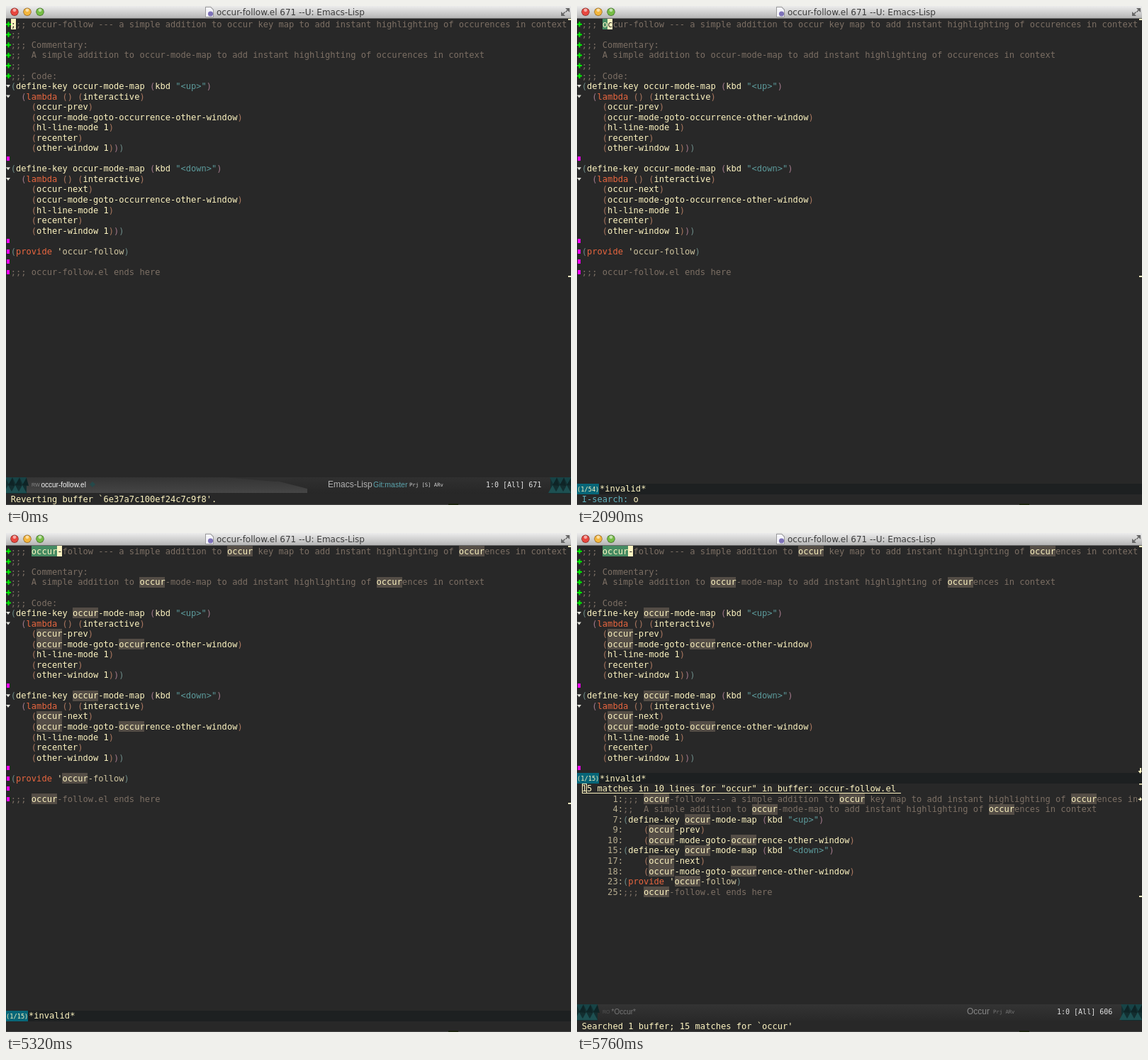
Animation, 797 px wide and 703 px high, one loop 8 s. Source, as an HTML page with a canvas:

```html
<!DOCTYPE html>
<html lang="en">
<head>
<meta charset="utf-8">
<title>occur-follow.el</title>
<style>
html, body { margin: 0; width: 100%; height: 100%; overflow: hidden; background: #282828; }
canvas { display: block; }
</style>
</head>
<body>
<canvas id="stage" width="797" height="703"></canvas>
<script>
const ctx = document.getElementById('stage').getContext('2d');
const LOOP = 8000, CHAR = 7.264, ROW = 14.54, LEFT = 6.8, TOP = 18.2, COLS = 108;
const MONO = '"DejaVu Sans Mono", monospace', SANS = '"Liberation Sans", Arial, sans-serif';
const BG = '#282828', FG = '#fdf4c1', COMMENT = '#7c6f64', KEYWORD = '#e9663f', STRING = '#5c9a9b',
  QUOTED = '#d0c5a0', LAZY = '#544d46', MATCH = '#468b62', TEAL = '#076678', MAGENTA = '#f200f2';
const PARENS = ['#6c8a86', '#a1788a', '#a9775f', '#6c8a86'];
const KEYS = [2090, 2360, 2540, 2800, 2890];
const WORD = 'occur';

const binding = (key, move) => `(define-key occur-mode-map (kbd "<${key}>")
  (lambda () (interactive)
    (occur-${move})
    (occur-mode-goto-occurrence-other-window)
    (hl-line-mode 1)
    (recenter)
    (other-window 1)))
`;
const source = `;;; occur-follow --- a simple addition to occur key map to add instant highlighting of occurences in context
;;
;;; Commentary:
;;  A simple addition to occur-mode-map to add instant highlighting of occurences in context
;;
;;; Code:
${binding('up', 'prev')}
${binding('down', 'next')}
(provide 'occur-follow)

;;; occur-follow.el ends here`;

// Syntax colouring: one colour per character.
let depth = 0;
function colourize(text) {
  const colours = [];
  for (const [token] of text.matchAll(/;.*|"[^"]*"|'|[()]|[^\s()"';]+|\s+/g)) {
    let colour = FG;
    if (token[0] === ';') colour = COMMENT;
    else if (token[0] === '"') colour = STRING;
    else if (token === '(') colour = PARENS[depth++];
    else if (token === ')') colour = PARENS[--depth];
    else if (token === 'lambda' || token === 'provide') colour = KEYWORD;
    else if (token === 'occur-follow') colour = QUOTED;
    for (const _ of token) colours.push(colour);
  }
  return colours;
}
const lines = source.split('\n').map((text, i) => ({
  text, number: i + 1, colours: colourize(text),
  hits: [...text.matchAll(/occur/g)].map(m => m.index)
}));

const colX = col => LEFT + col * CHAR;
const rowY = row => TOP + row * ROW;

function rect(x, y, w, h, colour) {
  ctx.fillStyle = colour;
  ctx.fillRect(x, y, w, h);
}

function poly(colour, ...points) {
  ctx.fillStyle = colour;
  ctx.beginPath();
  for (let i = 0; i < points.length; i += 2) ctx.lineTo(points[i], points[i + 1]);
  ctx.fill();
}

function disc(x, y, r, colour) {
  ctx.fillStyle = colour;
  ctx.beginPath();
  ctx.arc(x, y, r, 0, 7);
  ctx.fill();
}

function fade(y, h, ...colours) {
  const g = ctx.createLinearGradient(0, y, 0, y + h);
  colours.forEach((c, i) => g.addColorStop(i / (colours.length - 1), c));
  return g;
}

function label(text, x, y, font, colour) {
  ctx.font = font;
  ctx.fillStyle = colour;
  ctx.fillText(text, x, y);
}

// Monospaced text on a fixed pitch; colour is one value or one per character.
function mono(text, x, y, colour, pitch = CHAR) {
  ctx.font = `${pitch / 0.602}px ${MONO}`;
  [...text].forEach((ch, i) => {
    ctx.fillStyle = Array.isArray(colour) ? colour[i] : colour;
    if (ch !== ' ') ctx.fillText(ch, x + i * pitch, y);
  });
}

const write = (text, row, col = 0, colour = FG) => mono(text, colX(col), rowY(row) + 11.6, colour);
const block = (row, col, n, colour) =>
  rect(Math.round(colX(col)), Math.round(rowY(row)), Math.round(n * CHAR), 15, colour);

function codeLine(line, row, col, hits) {
  const colours = [...line.colours];
  for (const hit of hits) {
    block(row, col + hit, WORD.length, LAZY);
    colours.fill(FG, hit, hit + WORD.length);
  }
  write(line.text.slice(0, COLS - col), row, col, colours);
}

function titleBar() {
  rect(0, 0, 797, 18, fade(0, 18, '#ececec', '#d0d0d0', '#b2b2b2'));
  rect(0, 17, 797, 1, '#686868');
  [['#e8473f', '#8f2d28'], ['#f3b53c', '#986b1f'], ['#76bd45', '#44732a']].forEach(([fill, edge], i) => {
    const x = 12 + 18 * i;
    disc(x, 8.3, 5.7, edge);
    disc(x, 8.3, 4.9, fill);
    ctx.globalAlpha = 0.55;
    disc(x, 5.8, 2.4, '#fff');
    ctx.globalAlpha = 1;
  });
  poly('#999', 281, 1, 289, 1, 293, 5, 293, 16, 281, 16);
  poly('#f5f5fa', 282, 2, 288.5, 2, 292, 5.5, 292, 15, 282, 15);
  disc(288.5, 11, 3.6, '#7d72b8');
  label('occur-follow.el 671 --U: Emacs-Lisp', 297, 12.7, '12px "DejaVu Sans", sans-serif', '#3c3c3c');
  poly('#666', 789, 3, 795, 3, 795, 9);
  poly('#666', 783, 8, 783, 14, 789, 14);
  ctx.strokeStyle = '#666';
  ctx.lineWidth = 1.5;
  ctx.beginPath();
  ctx.moveTo(793, 5); ctx.lineTo(789.5, 8.5);
  ctx.moveTo(785, 12); ctx.lineTo(788.5, 8.5);
  ctx.stroke();
}

function fringe(lastRow) {
  for (let row = 0; row < lastRow; row++) {
    const y = rowY(row) + 7.6;
    if (row < 6) {
      rect(0, y - 1, 7, 2, '#00f000');
      rect(2.5, y - 3.5, 2, 7, '#00f000');
    } else if ([6, 7, 14, 15].includes(row)) {
      poly('#e4e4dc', 0, y - 2, 6, y - 2, 3, y + 2);
    } else if (row === 13 || row > 20) {
      rect(1, Math.round(y - 3), 4, 6, MAGENTA);
    }
  }
  rect(793, 18, 4, 2, FG);
}

function searchBar(row, count) {
  const y = Math.round(rowY(row)), w = count.length * 5.22;
  rect(0, y, 797, 15, '#1d2021');
  rect(0, y, Math.round(w), 15, TEAL);
  mono(count, 0, y + 11.3, FG, 5.22);
  mono('*invalid*', w + 0.7, rowY(row) + 11.6, FG);
}

function crystals(x) {
  rect(x, 664, 29, 23, '#132e30');
  for (let i = 0; i < 3; i++) {
    const a = x + i * 10 - 3;
    poly('#1d5052', a, 686, a + 6, 675, a + 12, 686);
    poly('#174346', a + 2, 664, a + 12, 664, a + 7, 674);
    poly('#0e2426', a + 6, 675, a + 12, 665, a + 15, 676);
  }
}

function modeLine(active) {
  rect(0, 664, 797, 23, active ? fade(664, 23, '#303030', '#272727') : fade(664, 23, '#343434', '#292929'));
  if (active) {
    poly(fade(664, 23, '#343434', '#464646'), 0, 664, 385, 664, 378, 668, 425, 680, 425, 686, 0, 686);
    poly('#303030', 310, 664, 425, 664, 380, 670);
  }
  crystals(0);
  crystals(768);
  if (active) {
    label('RW', 36, 677, `7px ${SANS}`, '#8a8a8a');
    label('occur-follow.el', 49.5, 677.5, `10px ${SANS}`, '#f4f4f4');
    poly('#24494a', 118, 674, 122, 670, 126, 674, 122, 678);
    label('Emacs-Lisp', 454, 677.7, `12px ${SANS}`, '#b2b2b2');
    label('Git:master', 518, 677.7, `10.5px ${SANS}`, '#5ba4ad');
    mono('Prj [S] ARv', 569, 677, '#d0d0d0', 4.35);
  } else {
    label('RO', 36, 677, `7px ${SANS}`, '#555');
    label('*Occur*', 48.5, 677.5, `10px ${SANS}`, '#777');
    label('Occur', 550, 677.7, `12px ${SANS}`, '#888');
    mono('Prj ARv', 587, 677, '#777', 4.35);
  }
  mono(`1:0 [All] ${active ? 671 : 606}`, 677, 677.7, '#e2e2e2', 6.02);
}

function occurWindow() {
  rect(0, rowY(22), 797, 703 - rowY(22), BG);
  searchBar(22, '(1/15)');
  write('15 matches in 10 lines for "occur" in buffer: occur-follow.el', 23);
  rect(7, 366, 450, 1, FG);
  ctx.strokeStyle = FG;
  ctx.lineWidth = 1;
  ctx.strokeRect(7.5, 353.5, 6, 13);
  lines.filter(line => line.hits.length).forEach((line, i) => {
    write(`${line.number}:`.padStart(8), 24 + i, 0, '#b8ad90');
    codeLine(line, 24 + i, 8, line.hits);
  });
  rect(794, 331, 2, 5, FG);
  poly(FG, 791.5, 335, 797, 335, 794.5, 339);
  rect(793, 353, 4, 1.5, FG);
  rect(792, 374.5, 3, 1.5, FG);
  poly(FG, 794, 372, 797, 375, 794, 378);
  rect(793, 511, 4, 2, FG);
  modeLine(false);
}

function echoArea(t, typed) {
  if (t < 500) write("Reverting buffer `6e37a7c100ef24c7c9f8'.", 46);
  else if (t < 5320) {
    write('I-search:', 46, 0, '#5fb0bc');
    write(WORD.slice(0, typed), 46, 10);
  } else if (t >= 5670) write("Searched 1 buffer; 15 matches for `occur'", 46);
}

function draw(t) {
  const typed = KEYS.filter(at => t >= at).length;
  const split = t >= 5760, lazy = t >= 3160;
  const visible = split ? 22 : lines.length;
  ctx.textBaseline = 'alphabetic';
  rect(0, 0, 797, 703, BG);
  titleBar();

  lines.slice(0, visible).forEach((line, row) => codeLine(line, row, 0, lazy ? line.hits : []));
  fringe(visible);
  const cursor = typed ? 4 + typed : 0;
  if (typed) {
    block(0, 4, typed, MATCH);
    write(WORD.slice(0, typed), 0, 4);
  }
  block(0, cursor, 1, FG);
  write(lines[0].text[cursor], 0, cursor, BG);

  if (split) occurWindow();
  else {
    rect(793, 380, 4, 2, FG);
    if (t < 500) modeLine(true);
    else searchBar(45, typed > 1 ? '(1/15)' : typed ? '(1/54)' : '(0/0)');
  }
  echoArea(t, typed);
  rect(0, 702, 797, 1, '#454545');
  rect(624, 701, 14, 2, '#1c2410');
}

const start = performance.now();
function tick() {
  draw((performance.now() - start) % LOOP);
  requestAnimationFrame(tick);
}
tick();
</script>
</body>
</html>
```
